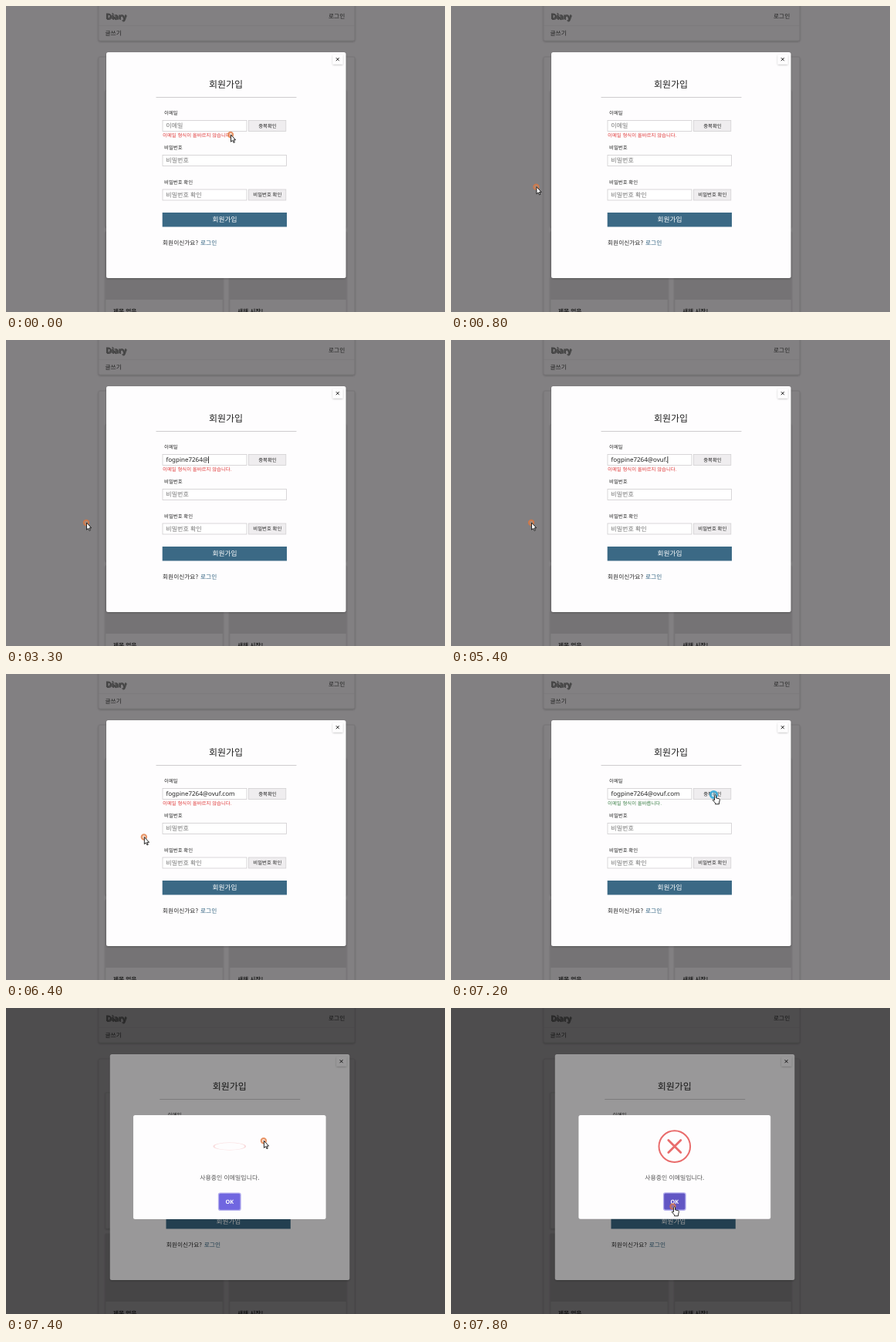
Recreate the animation shown at these times as an HTML page. Size 569 by 397 pixels, loop 8 s.

```html
<!DOCTYPE html>
<html lang="ko">
<head>
<meta charset="utf-8">
<title>회원가입</title>
<style>
  html, body { margin: 0; width: 100%; height: 100%; overflow: hidden; background: #828082; }
  svg { display: block; width: 569px; height: 397px; }
  text {
    font-family: "Noto Sans CJK KR", "Noto Sans CJK JP", "Noto Sans CJK", sans-serif;
    fill: #222; text-rendering: geometricPrecision; white-space: pre;
  }
  .latin { font-family: "Noto Sans", sans-serif; }
  .mid { text-anchor: middle; }
  .label { font-size: 6.4px; font-weight: 500; }
  .body { font-size: 7.7px; }
  .hint { font-size: 8px; fill: #757575; }
  .msg { font-size: 6.4px; font-weight: 500; }
  .bold { font-weight: 700; }
  .field { fill: #fff; stroke: #cfcdcf; stroke-width: .8; }
  .btn { fill: #efedef; stroke: #d2d0d2; stroke-width: .8; }
  .panel { fill: #828082; stroke: #757375; stroke-width: .8; }
  .link { fill: #2f607f; font-weight: 500; }
</style>
</head>
<body>
<svg viewBox="0 0 569 397">
  <defs>
    <filter id="soft" x="-20%" y="-20%" width="140%" height="150%">
      <feDropShadow dx="0" dy="1" stdDeviation="1" flood-opacity=".25"/>
    </filter>
    <filter id="glow" x="-20%" y="-20%" width="150%" height="160%">
      <feDropShadow dx="1" dy="1" stdDeviation=".7" flood-color="#333" flood-opacity=".75"/>
    </filter>
  </defs>

  <rect width="569" height="397" fill="#828082"/>
  <g filter="url(#soft)">
    <rect class="panel" x="120" y="-4" width="332" height="49" rx="2"/>
    <rect class="panel" x="120" y="66" width="332" height="350" rx="2"/>
  </g>
  <path d="M120 25.5H452" stroke="#7a787a" stroke-width=".7"/>
  <text class="latin bold" x="129" y="16.5" font-size="10.5" letter-spacing="-.3" style="fill:#444" filter="url(#glow)">Diary</text>
  <text class="body" x="418" y="16" style="font-weight:500">로그인</text>
  <text class="body" x="128.5" y="38" style="font-weight:500">글쓰기</text>
  <g filter="url(#soft)">
    <rect class="panel" x="129" y="110" width="152" height="176"/>
    <rect class="panel" x="290" y="110" width="151" height="176"/>
    <rect class="panel" x="129" y="293" width="152" height="120"/>
    <rect class="panel" x="290" y="293" width="151" height="120"/>
  </g>
  <path d="M129 293h152v88h-152zM290 293h151v88h-151z" fill="#757375"/>
  <text class="body bold" x="139" y="398.5">제목 없음</text>
  <text class="body bold" x="300" y="398.5">새해 시작!</text>

  <g id="modal">
    <rect x="130" y="60" width="310.5" height="293" rx="2.5" fill="#fefdfe" filter="url(#soft)"/>
    <rect x="423.5" y="63" width="13" height="12.5" rx="1" fill="#fefdfe" filter="url(#soft)"/>
    <path d="M427.8 67.2l4 4m0-4l-4 4" stroke="#222" stroke-width="1"/>
    <text class="mid" x="285" y="106" font-size="12" style="font-weight:500">회원가입</text>
    <path d="M194.5 118.5H376.5" stroke="#c9c7c9" stroke-width=".9"/>

    <text class="label" x="205" y="141">이메일</text>
    <rect class="field" x="203" y="148.5" width="109" height="14"/>
    <rect class="btn" x="314.5" y="148.5" width="48.3" height="14"/>
    <text class="label mid" x="339" y="157.8" style="font-weight:400">중복확인</text>
    <text class="hint" id="hint" x="207.3" y="158.3">이메일</text>
    <text class="latin" id="mail" x="207.5" y="157.6" font-size="8"></text>
    <rect id="caret" y="151" width=".8" height="9" fill="#111"/>
    <text class="msg" id="msg" x="203" y="169.6"></text>

    <text class="label" x="205" y="186">비밀번호</text>
    <rect class="field" x="203" y="193.5" width="160.5" height="14"/>
    <text class="hint" x="207.3" y="203.3">비밀번호</text>

    <text class="label" x="205" y="231">비밀번호 확인</text>
    <rect class="field" x="203" y="238" width="109" height="14"/>
    <rect class="btn" x="314.5" y="238" width="48.3" height="14"/>
    <text class="label mid" x="338.8" y="247.3" style="font-weight:400">비밀번호 확인</text>
    <text class="hint" x="207.3" y="248">비밀번호 확인</text>

    <rect x="202.7" y="268" width="161.3" height="18.5" fill="#3b6985"/>
    <text class="mid" x="283.6" y="280.2" font-size="8.7" style="fill:#fff;font-weight:500">회원가입</text>
    <text class="body" x="203" y="309.8">회원이신가요?</text>
    <text class="body link" x="252" y="309.8">로그인</text>
  </g>

  <rect id="shade" width="569" height="397"/>
  <g id="dialog">
    <rect x="-124.4" y="-67.5" width="248.8" height="134.7" rx="2.5" fill="#fefdfe"/>
    <g id="icon" fill="none" stroke="#e96c6c">
      <circle r="20.3" stroke-width="2"/>
      <path id="cross" d="M-8-8L8 8M8-8L-8 8" stroke-width="2.8" stroke-linecap="round"/>
    </g>
    <text class="mid" y="16" font-size="7.9" style="fill:#545454">사용중인 이메일입니다.</text>
    <rect x="-14.9" y="32.7" width="29.8" height="23.6" rx="2.8" fill="#b5afee"/>
    <rect id="ok" x="-13.6" y="34" width="27.2" height="21" rx="1.8"/>
    <text class="latin mid bold" y="47.2" font-size="7.3" style="fill:#fff">OK</text>
  </g>

  <g id="pointer">
    <circle id="ring" fill-opacity=".35"/>
    <g fill="#fff" stroke="#111" stroke-width=".9" stroke-linejoin="round">
      <path id="arrow" d="M.5 0V9.2L2.6 7.3 4.1 10.4 5.4 9.8 4 6.8H6.7Z"/>
      <path id="hand" d="M1 1.2Q2-.4 3 1.2V4.4L7 5.3Q8 5.7 7.9 6.9L7 10.5V12.3H2V10.8L-1 7.5Q-1.2 6.2 0 6.4L1 7.4Z"/>
    </g>
  </g>
</svg>
<script>
const LOOP = 8000, TICK = 100;
const EMAIL = "fogpine7264@ovuf.com";
const CENTER = [289.8, 206.6];
const OPEN = 7283;

// [time, typed characters, caret visible]
const typing = [
  [0, 0, 0], [1400, 1, 1], [1800, 3, 1], [2000, 4, 1], [2400, 7, 1], [2700, 8, 1],
  [2900, 10, 1], [3100, 11, 1], [3300, 12, 1], [3800, 12, 0], [4000, 13, 1],
  [4500, 13, 0], [5000, 14, 1], [5100, 15, 1], [5200, 16, 1], [5400, 17, 1],
  [5500, 18, 1], [5600, 19, 1], [5700, 20, 1], [6200, 20, 0]
];
// [time, x, y]
const route = [
  [0, 291, 167], [900, 104, 237], [6100, 104, 237], [6900, 340.5, 156.5],
  [7200, 340.5, 156.5], [7300, 342.5, 156.5], [7700, 287.5, 257.5], [8000, 287.5, 257.5]
];
const popup = [[0, .7], [.45, 1.05], [.8, .95], [1, 1]];
const mark = [[0, .4], [.5, .4], [.8, 1.15], [1, 1]];

const el = Object.fromEntries([...document.querySelectorAll("[id]")].map(n => [n.id, n]));
const set = (node, attrs) => { for (const k in attrs) node.setAttribute(k, attrs[k]); };
const show = (node, on) => { node.style.display = on ? "" : "none"; };
const clamp = v => Math.min(1, Math.max(0, v));
const smooth = k => k * k * (3 - 2 * k);

function track(keys, t, ease = k => k) {
  let i = 1;
  while (i < keys.length - 1 && t > keys[i][0]) i++;
  const a = keys[i - 1], b = keys[i];
  const k = ease(clamp((t - a[0]) / (b[0] - a[0])));
  return a.slice(1).map((v, j) => v + (b[j + 1] - v) * k);
}

function drawForm(t) {
  const [, count, caret] = typing.findLast(s => s[0] <= t);
  const valid = t >= 7100;
  el.mail.textContent = EMAIL.slice(0, count);
  show(el.hint, !count);
  show(el.caret, caret);
  if (caret) set(el.caret, { x: 207.6 + el.mail.getComputedTextLength() });
  el.msg.textContent = valid ? "이메일 형식이 올바릅니다." : "이메일 형식이 올바르지 않습니다.";
  el.msg.style.fill = valid ? "#3d8048" : "#e03a3a";
  set(el.modal, { transform: `translate(${t >= 7300 ? 4.8 : 0})` });
}

function drawDialog(t, hover) {
  const age = t - OPEN, open = age >= 0;
  show(el.dialog, open);
  set(el.shade, { opacity: !open ? 0 : t < 7400 ? .2 : .4 });
  if (!open) return;
  const [scale] = track(popup, age / 300);
  const k = clamp(age / 500), [size] = track(mark, k);
  const tilt = Math.cos((1 - k) * 100 * Math.PI / 180);
  set(el.dialog, { transform: `translate(${CENTER}) scale(${scale})` });
  set(el.icon, { transform: `translate(0 -27) scale(1 ${tilt})`, opacity: k < .1 ? 0 : k });
  set(el.cross, { transform: `scale(${size})`, opacity: clamp((k - .5) / .3) });
  set(el.ok, { fill: hover ? "#6256c4" : "#7066e0" });
}

function drawPointer(t, x, y, hand) {
  const press = t >= 7100 && t < 7400;
  set(el.pointer, { transform: `translate(${x} ${y})` });
  show(el.arrow, !hand);
  show(el.hand, hand);
  set(el.ring, press
    ? { r: 4.3, fill: "#7fd0ee", stroke: "#35a9d8", "stroke-width": 2.6, "stroke-opacity": .9 }
    : { r: 3.2, fill: "#f0a070", stroke: "#e0763c", "stroke-width": 2, "stroke-opacity": .75 });
}

function render(now) {
  const t = Math.floor(now % LOOP / TICK) * TICK;
  const [x, y] = track(route, t, smooth);
  const onCheck = t < 7300 && x > 314 && y < 163;
  const onOk = t > 7300 && y > 240 && x < 304;
  drawForm(t);
  drawDialog(t, onOk);
  drawPointer(t, x, y, onCheck || onOk);
}

const start = performance.now();
(function loop() {
  render(performance.now() - start);
  requestAnimationFrame(loop);
})();
</script>
</body>
</html>
```
